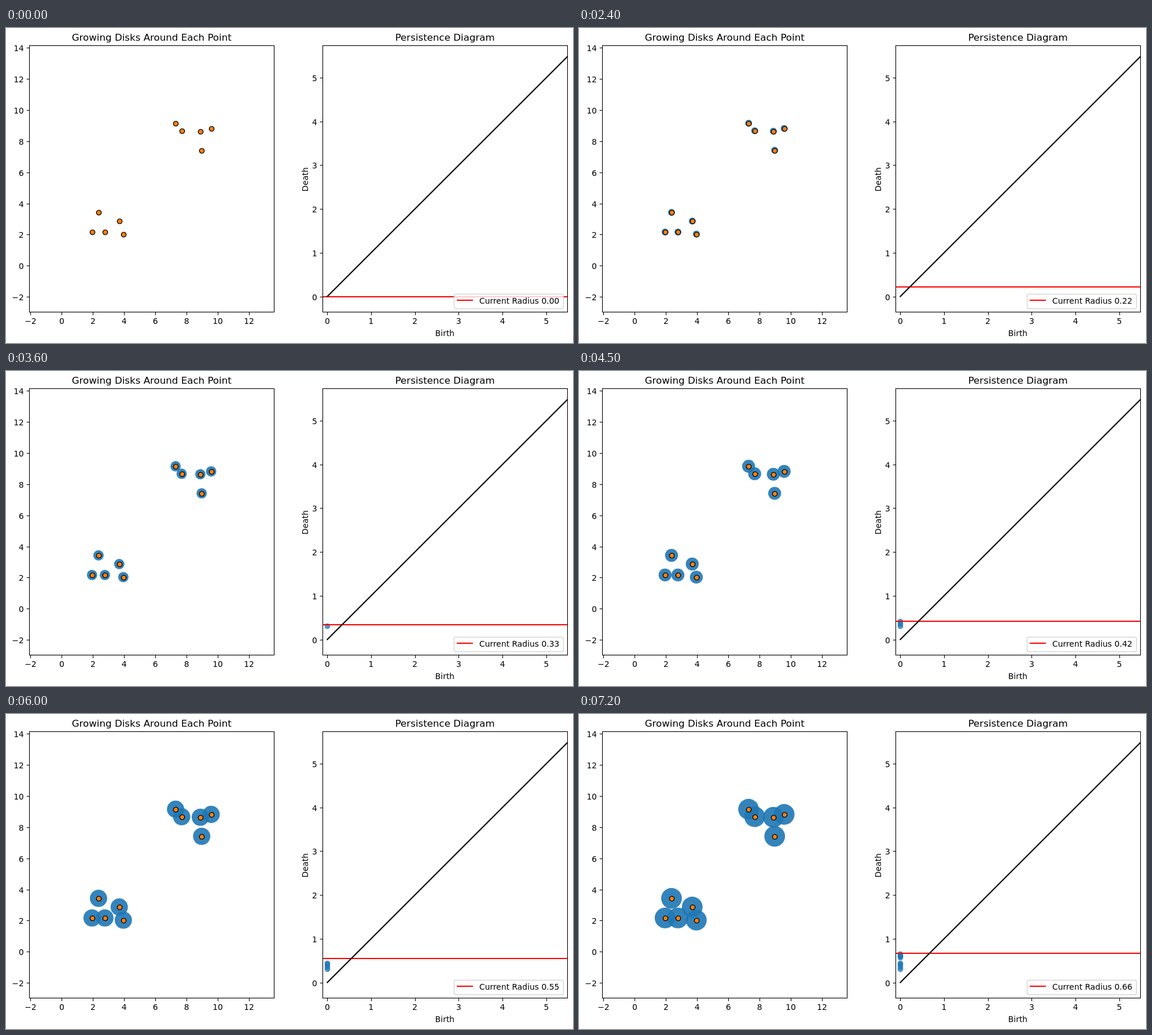
Animation, 980 px wide and 545 px high, one loop 8 s. Source, as an HTML page with a canvas:

```html
<!DOCTYPE html>
<html lang="en">
<head>
<meta charset="utf-8">
<title>Growing Disks</title>
<style>
  html, body { margin: 0; width: 100%; height: 100%; overflow: hidden; background: #fff; }
  canvas { display: block; width: 980px; height: 545px; }
</style>
</head>
<body>
<canvas id="stage" width="980" height="545"></canvas>
<script>
const ctx = document.getElementById("stage").getContext("2d");
const LOOP = 8000, STEP_MS = 300, LAST_STEP = 24, RADIUS_STEP = 0.0277;
const BLUE = "#1f77b4", ORANGE = "#ff7f0e", RED = "#ff0000";
const HAIR = 1.11, EDGE = 1.39, LINE = 2.08, DOT = 4.17;

// Each panel: frame edges, pixel position of the data origin, pixels per unit
const disksPanel = { left: 40.5, right: 463.5, top: 30.5, bottom: 492, x0: 96.4, y0: 411.4, unit: 26.97 };
const diagramPanel = { left: 547.5, right: 970.5, top: 30.5, bottom: 492, x0: 555.3, y0: 464.52, unit: 75.7 };

// Point centres in pixels
const points = [
  [148.75, 352.9], [159.9, 319], [170.9, 352.9], [195.7, 334], [202.8, 356.6],
  [293.1, 164.8], [303.6, 177.8], [335.9, 178.6], [354.6, 173.7], [338.2, 211.6]
];

// Radii at which growing disks first join two components
function mergeRadii() {
  const group = points.map((_, i) => i);
  const pairs = [];
  points.forEach(([x, y], i) => {
    for (let j = 0; j < i; j++) {
      const gap = Math.hypot(x - points[j][0], y - points[j][1]);
      pairs.push({ i, j, r: gap / 2 / disksPanel.unit });
    }
  });
  pairs.sort((a, b) => a.r - b.r);
  const radii = [];
  for (const { i, j, r } of pairs) {
    const from = group[i], to = group[j];
    if (from === to) continue;
    group.forEach((g, n) => { if (g === from) group[n] = to; });
    radii.push(r);
  }
  return radii;
}
const deaths = mergeRadii();

const snap = v => Math.round(v) + 0.5;

function line(x1, y1, x2, y2, color, width) {
  ctx.strokeStyle = color;
  ctx.lineWidth = width;
  ctx.beginPath();
  ctx.moveTo(x1, y1);
  ctx.lineTo(x2, y2);
  ctx.stroke();
}

function circle(x, y, r, fill, stroke) {
  ctx.beginPath();
  ctx.arc(x, y, r, 0, Math.PI * 2);
  ctx.fillStyle = fill;
  ctx.fill();
  if (!stroke) return;
  ctx.strokeStyle = stroke;
  ctx.lineWidth = EDGE;
  ctx.stroke();
}

function text(str, x, y, align = "center", size = 13.89) {
  ctx.font = `${size}px "DejaVu Sans", sans-serif`;
  ctx.textAlign = align;
  ctx.fillStyle = "#000";
  ctx.fillText(str, x, y);
}

function drawAxes(p, title, xTicks, yTicks) {
  const label = v => String(v).replace("-", "\u2212");
  for (const v of xTicks) {
    const x = p.x0 + v * p.unit;
    line(snap(x), p.bottom, snap(x), p.bottom + 4.86, "#000", HAIR);
    text(label(v), x, 511.5);
  }
  for (const v of yTicks) {
    const y = p.y0 - v * p.unit;
    line(p.left - 4.86, snap(y), p.left, snap(y), "#000", HAIR);
    text(label(v), p.left - 9.7, Math.round(y) + 5.5, "right");
  }
  ctx.strokeStyle = "#000";
  ctx.lineWidth = HAIR;
  ctx.strokeRect(p.left, p.top, p.right - p.left, 461);
  text(title, (p.left + p.right) / 2 - 0.3, 22, "center", 16.67);
}

function drawDisks(radius) {
  ctx.globalAlpha = 0.9;
  for (const [x, y] of points) circle(x, y, radius * disksPanel.unit, BLUE);
  ctx.globalAlpha = 1;
  for (const [x, y] of points) circle(snap(x), snap(y), DOT, ORANGE, "#000");
}

function drawDiagram(radius) {
  const p = diagramPanel;
  ctx.save();
  ctx.beginPath();
  ctx.rect(p.left, p.top, p.right - p.left, p.bottom - p.top);
  ctx.clip();

  ctx.globalAlpha = 0.75;
  for (const d of deaths) {
    if (d <= radius) circle(snap(p.x0), snap(p.y0 - d * p.unit), DOT, BLUE, BLUE);
  }
  ctx.globalAlpha = 1;

  const level = Math.round(p.y0 - radius * p.unit);
  line(p.left, level, p.right, level, RED, 2);
  ctx.lineCap = "square";
  line(p.x0, p.y0, p.x0 + 6 * p.unit, p.y0 - 6 * p.unit, "#000", LINE);
  ctx.restore();
}

function drawLegend(radius) {
  ctx.globalAlpha = 0.8;
  ctx.beginPath();
  ctx.roundRect(774.5, 460.5, 189, 25, 2.8);
  ctx.fillStyle = "#fff";
  ctx.fill();
  ctx.strokeStyle = "#ccc";
  ctx.lineWidth = EDGE;
  ctx.stroke();
  ctx.globalAlpha = 1;
  line(779, 471, 807, 471, RED, 2);
  text("Current Radius " + radius.toFixed(2), 818, 477, "left");
}

function draw(time) {
  const step = Math.min(LAST_STEP, Math.floor((time % LOOP) / STEP_MS));
  const radius = step * RADIUS_STEP;
  ctx.fillStyle = "#fff";
  ctx.fillRect(0, 0, 980, 545);

  drawDisks(radius);
  drawDiagram(radius);
  drawAxes(disksPanel, "Growing Disks Around Each Point",
    [-2, 0, 2, 4, 6, 8, 10, 12], [-2, 0, 2, 4, 6, 8, 10, 12, 14]);
  drawAxes(diagramPanel, "Persistence Diagram", [0, 1, 2, 3, 4, 5], [0, 1, 2, 3, 4, 5]);

  text("Birth", 758.5, 533);
  ctx.save();
  ctx.translate(521.5, 262);
  ctx.rotate(-Math.PI / 2);
  text("Death", 0, 0);
  ctx.restore();
  drawLegend(radius);
}

const start = performance.now();
function tick() {
  draw(performance.now() - start);
  requestAnimationFrame(tick);
}
tick();
</script>
</body>
</html>
```
